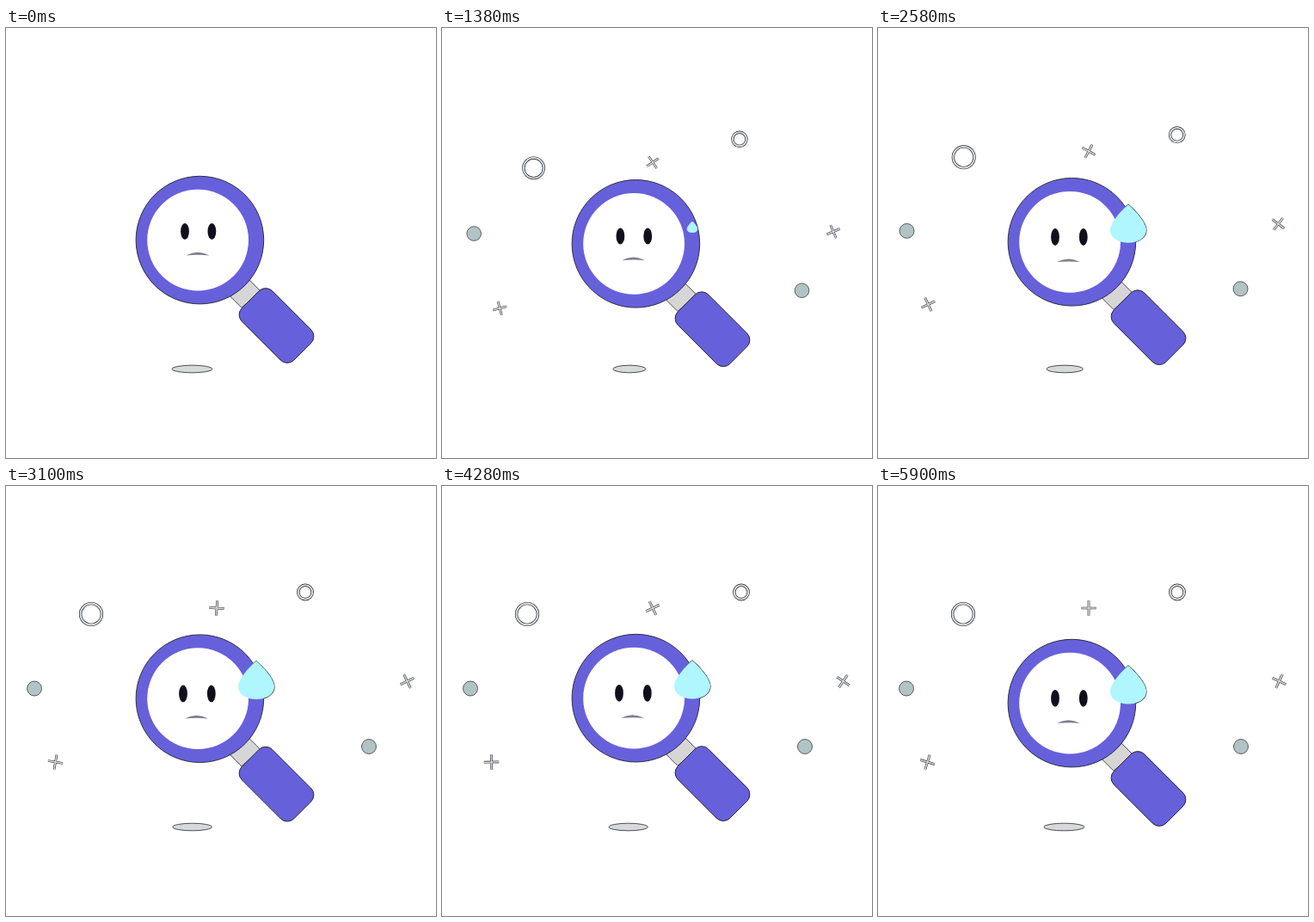
An HTML page with a canvas that plays this animation: 500 px wide and 500 px high, repeating every 5.92 s.

```html
<!DOCTYPE html>
<html>
<head>
<meta charset="utf-8">
<style>
html, body { margin: 0; width: 100%; height: 100%; overflow: hidden; background: #fff; }
canvas { display: block; width: 500px; height: 500px; }
</style>
</head>
<body>
<canvas id="stage" width="500" height="500"></canvas>
<script>
const ctx = document.getElementById('stage').getContext('2d');
const LOOP = 5920, BOB = 1967, POP = 876, TAU = Math.PI * 2;
const PURPLE = '#6760db', DARK = '#20242c', GREY = '#d6dadb', DOT = '#b2c3c4';
const ORIGIN = { x: 245, y: 415.5 };

// Overshoot and rebound levels of the burst
const WIDE = { high: 1.118, low: 0.911 }, TIGHT = { high: 1.105, low: 0.953 };

// spin is in degrees per ms, turn is the angle at time 0
const bits = [
  { kind: 'ring', x: 99, y: 149, r: 12.4, pop: WIDE },
  { kind: 'ring', x: 348, y: 123.5, r: 8.2, pop: TIGHT },
  { kind: 'dot', x: 33, y: 235.5, r: 8.5, pop: TIGHT },
  { kind: 'dot', x: 422, y: 303, r: 8.5, pop: TIGHT },
  { kind: 'cross', x: 245, y: 142, r: 8.7, pop: WIDE, spin: 0.127, turn: -119.4 },
  { kind: 'cross', x: 466.5, y: 227, r: 8.7, pop: WIDE, spin: 0.0506, turn: -3 },
  { kind: 'cross', x: 57.5, y: 321, r: 8.7, pop: WIDE, spin: 0.067, turn: -198 }
];

const clamp = v => Math.max(0, Math.min(1, v));
const mix = (a, b, k) => a + (b - a) * k;
const smooth = v => { v = clamp(v); return v * v * (3 - 2 * v); };

function fill(path, color) {
  ctx.fillStyle = color;
  ctx.fill(path);
}

function line(path, color, width) {
  ctx.strokeStyle = color;
  ctx.lineWidth = width;
  ctx.stroke(path);
}

function oval(x, y, rx, ry = rx) {
  const p = new Path2D();
  p.ellipse(x, y, rx, ry, 0, 0, TAU);
  return p;
}

function popLevel(t, { high, low }) {
  const u = t / POP;
  if (u < 1) return high * u;
  if (u < 2) return mix(high, low, 1 - (2 - u) ** 2);
  return mix(low, 1, clamp(u - 2));
}

function drawBit(b, t) {
  const k = popLevel(t, b.pop);
  if (k <= 0) return;
  ctx.save();
  ctx.translate(mix(ORIGIN.x, b.x, k), mix(ORIGIN.y, b.y, k));
  ctx.scale(k, k);
  if (b.kind === 'cross') {
    ctx.rotate((b.turn + b.spin * t) * Math.PI / 180);
    const arms = new Path2D(`M${-b.r} 0H${b.r}M0 ${-b.r}V${b.r}`);
    line(arms, DARK, 2.7);
    line(arms, GREY, 1.6);
  } else {
    const disc = oval(0, 0, b.r);
    if (b.kind === 'dot') {
      fill(disc, DOT);
      line(disc, DARK, 0.7);
    } else {
      line(disc, DARK, 3.4);
      line(disc, GREY, 2.1);
    }
  }
  ctx.restore();
}

function bobLevel(t) {
  const u = t / BOB;
  return u < 1 ? u : clamp(Math.abs(2 - u)) ** 2.7;
}

function drawShadow(t) {
  const k = t < 2 * BOB ? bobLevel(t) : 0.25 * Math.sin(Math.PI * clamp(t / BOB - 2));
  const shape = oval(216.4 + 2.2 * k, 396.5, 23.4 - 6.3 * k, 4.3);
  fill(shape, GREY);
  line(shape, DARK, 0.8);
}

const drop = new Path2D('M291 203C285 208 270 223 270 233C270 242 280 247.5 291 247.5S312 242 312 233C312 223 297 208 291 203Z');
const neck = new Path2D('M283 293L296 306L274 325.3L260.5 311.8Z');
const handle = new Path2D();
handle.roundRect(-42.8, -25, 85.6, 50, 11);

function withDrop(k, paint) {
  if (k <= 0) return;
  ctx.save();
  ctx.translate(291, 228);
  ctx.scale(k, k);
  ctx.translate(-291, -228);
  paint();
  ctx.restore();
}

function drawFace(k) {
  const y = mix(236.5, 240.8, k), ry = mix(9.4, 9.9, k);
  fill(oval(mix(208, 206, k), y, 4.9, ry), '#110f1c');
  fill(oval(mix(239.4, 238.8, k), y, 4.9, ry), '#110f1c');
  ctx.save();
  ctx.translate(mix(223, 221.5, k), mix(264.4, 269.8, k));
  fill(new Path2D('M-13.5 0Q0 -7.2 13.5 0Q0 -1.2 -13.5 0Z'), '#7b818c');
  ctx.restore();
}

function drawGlass(t) {
  const worry = smooth((t - 1200) / 500);
  ctx.save();
  ctx.translate(0, 6 * bobLevel(t));
  withDrop(worry, () => line(drop, DARK, 1.2));

  fill(neck, '#d6d6d6');
  line(neck, DARK, 0.8);
  ctx.save();
  ctx.translate(314.5, 346);
  ctx.rotate(Math.PI / 4);
  fill(handle, PURPLE);
  line(handle, DARK, 0.9);
  ctx.restore();

  const rim = oval(225.4, 246.6, 74.3);
  fill(rim, PURPLE);
  line(rim, DARK, 0.9);
  fill(oval(223.1, 246.6, 58.9), '#fff');

  drawFace(worry);
  withDrop(worry, () => fill(drop, '#aff6ff'));
  ctx.restore();
}

function frame(now) {
  const t = now % LOOP;
  ctx.fillStyle = '#fff';
  ctx.fillRect(0, 0, 500, 500);
  drawShadow(t);
  bits.forEach(b => drawBit(b, t));
  drawGlass(t);
}

const start = performance.now();
function tick() {
  frame(performance.now() - start);
  requestAnimationFrame(tick);
}
tick();
</script>
</body>
</html>
```
